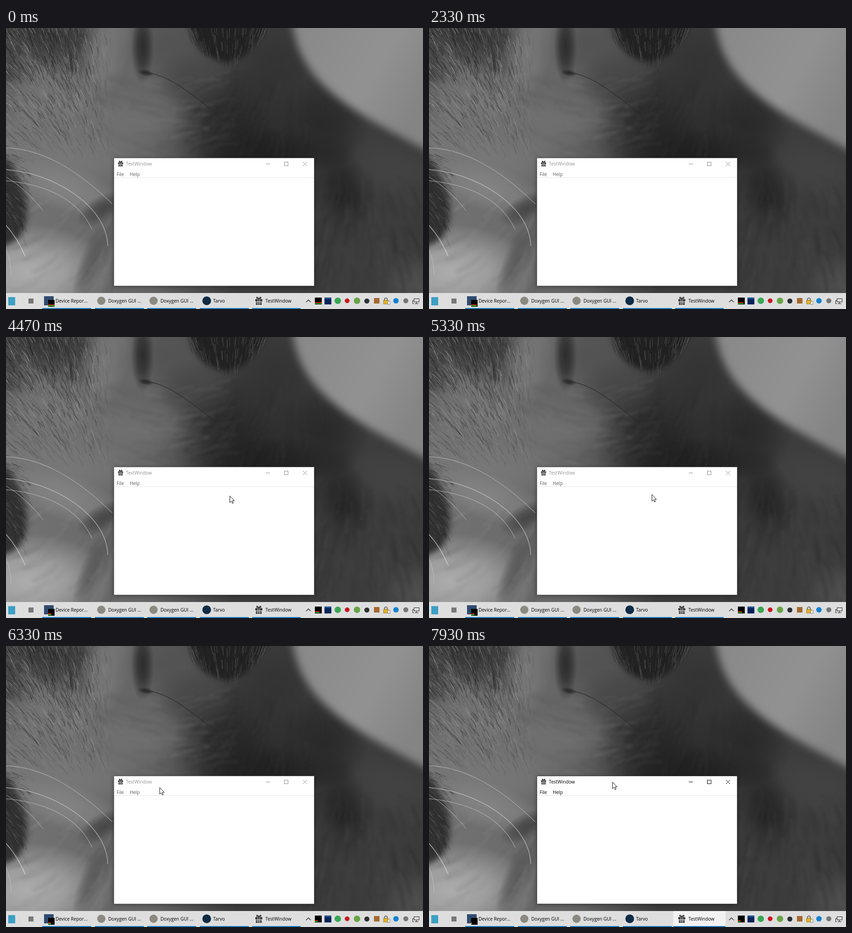
Recreate the animation shown at these times as an HTML page with a canvas. Size 910x615 px, loop 8000 ms.

```html
<!DOCTYPE html>
<html lang="en">
<head>
<meta charset="utf-8">
<title>Desktop</title>
<style>
  html, body { margin: 0; width: 910px; height: 615px; overflow: hidden; background: #444; }
  canvas, svg { position: absolute; left: 0; top: 0; }
  text { font: 10.1px "Open Sans", "Noto Sans", sans-serif; white-space: pre; }
  .sharp { shape-rendering: crispEdges; }
</style>
</head>
<body>
<canvas id="wallpaper" width="910" height="615"></canvas>
<svg id="desktop" width="910" height="615" viewBox="0 0 910 615">
  <defs>
    <filter id="shade" x="-10%" y="-10%" width="120%" height="125%"><feGaussianBlur stdDeviation="5"/></filter>
    <g id="gift">
      <path d="M0 3.5H12V7H0ZM1 8H11V13H1Z" fill="#333"/>
      <path d="M6 3C1 3 2-1 4 .5L6 3L8 .5C10-1 11 3 6 3" fill="none" stroke="#333" stroke-width="1.3"/>
      <path d="M4.5 3.5V13M7.5 3.5V13M1 10H11" stroke="#ddd" stroke-width=".8"/>
    </g>
  </defs>

  <rect x="235" y="286" width="438" height="280" opacity=".4" filter="url(#shade)"/>
  <g id="window">
    <rect id="frame" class="sharp" x="235" y="284" width="438" height="281"/>
    <rect class="sharp" x="236" y="285" width="436" height="279" fill="#fff"/>
    <path class="sharp" d="M236 327.5H672" stroke="#e6e6e6"/>
    <use id="titleIcon" href="#gift" transform="translate(244.5 291) scale(.92)"/>
    <g id="caption">
      <text x="261.5" y="301">TestWindow</text>
    </g>
    <g id="menu">
      <text x="241.5" y="324">File</text>
      <text x="270" y="324">Help</text>
    </g>
    <g id="buttons" fill="none">
      <path class="sharp" d="M567 297.5H576M607.5 293.5H615.5V301.5H607.5Z"/>
      <path d="M648 293L657 302M657 293L648 302"/>
    </g>
  </g>

  <rect class="sharp" y="580" width="910" height="35" fill="#dedede"/>
  <rect id="activeTab" class="sharp" x="533" y="580" width="114" height="35" fill="#f2f2f2"/>
  <g id="tabs"></g>

  <rect x="5" y="589" width="15" height="18" fill="#3c9fc4"/>
  <rect x="49" y="592" width="11" height="11" fill="#777"/>
  <rect x="83" y="587" width="21" height="20" fill="#314b70"/>
  <circle cx="208" cy="597" r="9" fill="#8b8980"/>
  <circle cx="322" cy="597" r="9" fill="#8b8980"/>
  <circle cx="438" cy="597" r="9.5" fill="#0f2b46"/>
  <use href="#gift" transform="translate(544 589) scale(1.28)"/>

  <g class="sharp">
    <rect x="92" y="595" width="14" height="15"/>
    <rect id="bigRed" x="92" y="605" height="2" fill="#e02020"/>
    <rect id="bigGreen" x="92" y="607" height="2" fill="#00c000"/>
    <rect x="674" y="590" width="15" height="15"/>
    <rect id="smallRed" x="674" y="600" height="2" fill="#e00000"/>
    <rect id="smallGreen" x="674" y="602" height="2" fill="#00b000"/>
    <rect x="695" y="590" width="15" height="15" fill="#06245a"/>
    <path d="M695 591.5H710" stroke="#2464a8" stroke-width="2"/>
  </g>

  <path d="M655 600L660 595L665 600" fill="none" stroke="#222" stroke-width="1.3"/>
  <circle cx="724" cy="597" r="7" fill="#38a653"/>
  <circle cx="744.5" cy="597" r="4.8" fill="#d3141e" stroke="#9a2222" stroke-width=".8"/>
  <circle cx="766" cy="597" r="7" fill="#68a446"/>
  <circle cx="787.5" cy="597.5" r="5.5" fill="#2b3033"/>
  <rect x="803" y="591" width="12" height="12" fill="#a4682d"/>
  <path d="M826 596V593Q829 588 832 593V596" fill="none" stroke="#555" stroke-width="1.6"/>
  <rect x="824" y="596" width="10" height="8" fill="#e8b520" stroke="#805f15" stroke-width=".8"/>
  <path d="M833 598H838V605H833Z" fill="#f7f7f7" stroke="#666" stroke-width=".8"/>
  <circle cx="851" cy="597" r="6" fill="#1482d2"/>
  <circle cx="872.5" cy="597" r="5.5" fill="#777"/>
  <path class="sharp" d="M890.5 592.5H901.5V599.5H890.5ZM895.5 600V603M892 603.5H900M890 596.5H887.5V603.5H890" fill="none" stroke="#222"/>

  <g id="tooltip">
    <rect x="849" y="564" width="70" height="17" opacity=".25"/>
    <rect class="sharp" x="848.5" y="562.5" width="70" height="16" fill="#fff" stroke="#777"/>
    <text x="852.5" y="574" fill="#555">Velmora Pen</text>
  </g>
  <path id="cursor" d="M.5.8V15.3L3.8 12.2L6.1 17.2L8.3 16.2L6 11.3H10.4Z" fill="#fff" stroke="#111" stroke-width="1"/>
</svg>

<script>
const $ = id => document.getElementById(id);
const gray = (v, a = 1) => `rgba(${v},${v},${v},${a})`;

let seed = 7;
const random = () => (seed = (seed * 16807) % 2147483647) / 2147483647;
const between = (a, b) => a + (b - a) * random();

function paintWallpaper() {
  const c = $("wallpaper").getContext("2d");

  const blob = (x, y, rx, ry, turn, tone) => {
    c.save();
    c.translate(x, y);
    c.rotate(turn);
    c.scale(rx * 1.5, ry * 1.5);
    const g = c.createRadialGradient(0, 0, 0, 0, 0, 1);
    g.addColorStop(0, gray(tone, .95));
    g.addColorStop(.45, gray(tone, .7));
    g.addColorStop(1, gray(tone, 0));
    c.fillStyle = g;
    c.fillRect(-1, -1, 2, 2);
    c.restore();
  };

  // Hairs inside a box; angle and tone range may depend on the position.
  const fur = ({ x, y, w, h, count, length, angle, tones, alpha, width = 1 }) => {
    for (let i = 0; i < count; i++) {
      const u = random(), v = random();
      const fade = Math.min(1, 4 * Math.min(1 - u, 1 - v) + .1);
      const px = x + u * w, py = y + v * h;
      const a = angle(u, v) + between(-.15, .15), len = length * between(.6, 1.3);
      c.strokeStyle = gray(Math.round(between(...tones)), alpha * fade);
      c.lineWidth = width * between(.6, 1.4);
      c.beginPath();
      c.moveTo(px, py);
      c.quadraticCurveTo(px + len * .5 * Math.cos(a), py + len * .5 * Math.sin(a),
        px + len * Math.cos(a + .25), py + len * Math.sin(a + .25));
      c.stroke();
    }
  };

  const line = (d, tone, alpha, width) => {
    c.strokeStyle = gray(tone, alpha);
    c.lineWidth = width;
    c.stroke(new Path2D(d));
  };

  const base = c.createLinearGradient(0, 0, 910, 0);
  base.addColorStop(0, "#747474");
  base.addColorStop(.35, "#646464");
  base.addColorStop(.55, "#3c3c3c");
  base.addColorStop(1, "#3d3d3d");
  c.fillStyle = base;
  c.fillRect(0, 0, 910, 615);

  // Muzzle and cheek
  blob(90, 15, 120, 55, .2, 50);
  blob(0, 100, 40, 80, 0, 65);
  blob(215, 50, 36, 80, .2, 122);
  blob(80, 170, 110, 45, .3, 116);
  blob(350, 40, 60, 60, 0, 82);
  blob(298, 40, 17, 55, 0, 42);
  blob(250, 205, 110, 45, -.1, 112);
  blob(410, 120, 55, 45, .6, 70);
  blob(120, 285, 140, 45, 0, 120);
  blob(130, 350, 90, 35, .3, 132);
  blob(215, 395, 45, 20, -.5, 68);
  blob(50, 535, 120, 70, 0, 176);
  blob(195, 500, 20, 75, .4, 88);

  // Neck and body
  blob(510, 225, 100, 95, 0, 37);
  blob(590, 110, 70, 90, 0, 50);
  blob(590, 270, 120, 35, 0, 31);
  blob(690, 210, 70, 70, .6, 40);
  blob(850, 315, 80, 45, .4, 67);
  blob(735, 375, 45, 85, -.2, 36);
  blob(800, 490, 110, 60, .5, 62);
  blob(895, 565, 60, 45, 0, 80);
  blob(690, 470, 25, 100, 0, 58);

  c.filter = "blur(9px)";
  const wall = c.createLinearGradient(640, 0, 910, 150);
  wall.addColorStop(0, "#888");
  wall.addColorStop(.6, "#929292");
  wall.addColorStop(1, "#848484");
  c.fillStyle = wall;
  c.fill(new Path2D("M622-30C632 65 670 108 730 157C790 202 860 236 940 280V-30Z"));

  // Soft strands
  c.filter = "blur(3px)";
  fur({ x: 170, y: 100, w: 300, h: 190, count: 130, length: 60, width: 3, alpha: .25,
    angle: u => .25 - u * .9, tones: [60, 145] });
  fur({ x: 60, y: 360, w: 200, h: 230, count: 80, length: 65, width: 3, alpha: .3,
    angle: u => 2.6 - u, tones: [80, 170] });
  fur({ x: 670, y: 310, w: 250, h: 280, count: 170, length: 55, width: 3, alpha: .28,
    angle: u => 1.7 - u * .9, tones: [25, 100] });
  fur({ x: 420, y: 110, w: 260, h: 180, count: 70, length: 60, width: 4, alpha: .25,
    angle: u => 2.2 - u, tones: [25, 75] });
  c.filter = "none";

  // Sharp coat in the upper left
  fur({ x: -20, y: -20, w: 250, h: 290, count: 1100, length: 24, width: 1.2, alpha: .5,
    angle: (u, v) => .35 + u * .6 + (1 - v) * .35, tones: [35, 165] });
  fur({ x: -20, y: -20, w: 200, h: 130, count: 350, length: 22, width: 1.4, alpha: .5,
    angle: u => .6 + u * .7, tones: [25, 70] });

  // Nose fur
  c.filter = "blur(6px)";
  c.fillStyle = "#212121";
  c.fill(new Path2D("M396-20Q405 40 440 60Q490 92 530 50Q555 25 575-20Z"));
  c.filter = "none";
  for (let i = 0; i < 150; i++) {
    const u = random(), depth = 75 * Math.sin(Math.PI * (u * .9 + .08));
    const x = 398 + u * 175, y = between(-10, depth - 5);
    line(`M${x} ${y}q${(.5 - u) * 5} 10 ${(.5 - u) * 16} 20`, Math.round(between(20, 125)), .5, 1);
  }

  // Dark patch at the left edge
  c.filter = "blur(7px)";
  c.fillStyle = "#303030";
  c.fill(new Path2D("M-20 270Q15 290 26 330Q58 385 38 440Q25 475-20 480Z"));
  c.filter = "none";
  fur({ x: -25, y: 275, w: 70, h: 190, count: 200, length: 20, width: 1.2, alpha: .5,
    angle: (u, v) => .2 + v * .7, tones: [20, 115] });

  // Whiskers
  line("M0 262C80 265 155 310 232 385", 190, .65, 1.3);
  line("M0 310C95 315 220 385 222 477", 200, .7, 1.5);
  line("M0 334C80 342 155 370 188 441", 190, .6, 1.3);
  line("M0 326Q42 350 81 400", 200, .5, 1.2);
  line("M0 432Q25 460 42 500", 220, .75, 1.4);
  line("M0 485Q11 510 11 540", 215, .45, 1.2);
  line("M300 97C350 99 400 140 456 185", 40, .75, 1.4);
  blob(305, 98, 12, 5, .2, 40);
}

function buildTabs() {
  const labels = ["Device Repor...", "Doxygen GUI ...", "Doxygen GUI ...", "Tarvo", "TestWindow"];
  $("tabs").innerHTML = labels.map((label, i) => {
    const x = Math.round(79 + i * 114.5);
    return `<text x="${x + 29}" y="601">${label}</text>
      <rect id="tab${i}" class="sharp" x="${x}" y="613" width="107" height="2" fill="#0a74c4"/>`;
  }).join("");
}

const LOOP = 8000, STEP = 1000 / 15;

// Pointer path: step, x, y
const path = [
  [45, 866, 521], [46, 650, 440], [47, 527, 390], [61, 527, 390], [67, 488, 347],
  [74, 486, 344], [81, 486, 344], [86, 343, 321], [87, 343, 321], [95, 335, 309],
  [100, 375, 297], [114, 375, 297], [116, 399, 297], [118, 399, 297], [119, 400, 297]
];

function pointerAt(step) {
  const next = path.findIndex(p => p[0] >= step);
  if (next <= 0) return path[0].slice(1);
  const [s0, x0, y0] = path[next - 1], [s1, x1, y1] = path[next];
  const k = (step - s0) / (s1 - s0);
  return [Math.round(x0 + (x1 - x0) * k), Math.round(y0 + (y1 - y0) * k)];
}

const set = (id, attrs) => {
  for (const key in attrs) $(id).setAttribute(key, attrs[key]);
};

function render(time) {
  const step = Math.min(119, Math.floor(time / STEP + .1));
  const active = step >= 105;

  const fade = Math.min(1, Math.max(0, (24 - step) / 3));
  set("tooltip", { opacity: step < 3 ? 0 : fade });

  const [x, y] = pointerAt(step);
  set("cursor", { transform: `translate(${x} ${y})`, visibility: step < 45 ? "hidden" : "visible" });

  set("frame", { fill: active ? "#4a4a4a" : "#707070" });
  set("caption", { fill: active ? "#000" : "#929292" });
  set("menu", { fill: active ? "#000" : "#5c5c5c" });
  set("buttons", { stroke: active ? "#000" : "#8c8c8c" });
  set("activeTab", { visibility: active ? "visible" : "hidden" });
  set("tab4", { x: active ? 533 : 537, width: active ? 114 : 106 });

  // Load graphs scroll left once a second.
  const small = Math.round(15 - 1.3 * Math.max(0, Math.floor((step - 5) / 15)));
  const big = Math.round(14 - 1.7 * Math.max(0, Math.floor((step - 6) / 15)));
  for (const color of ["Red", "Green"]) {
    set("small" + color, { width: small });
    set("big" + color, { width: big });
  }
}

paintWallpaper();
buildTabs();
const start = performance.now();
function tick() {
  render((performance.now() - start) % LOOP);
  requestAnimationFrame(tick);
}
tick();
</script>
</body>
</html>
```
